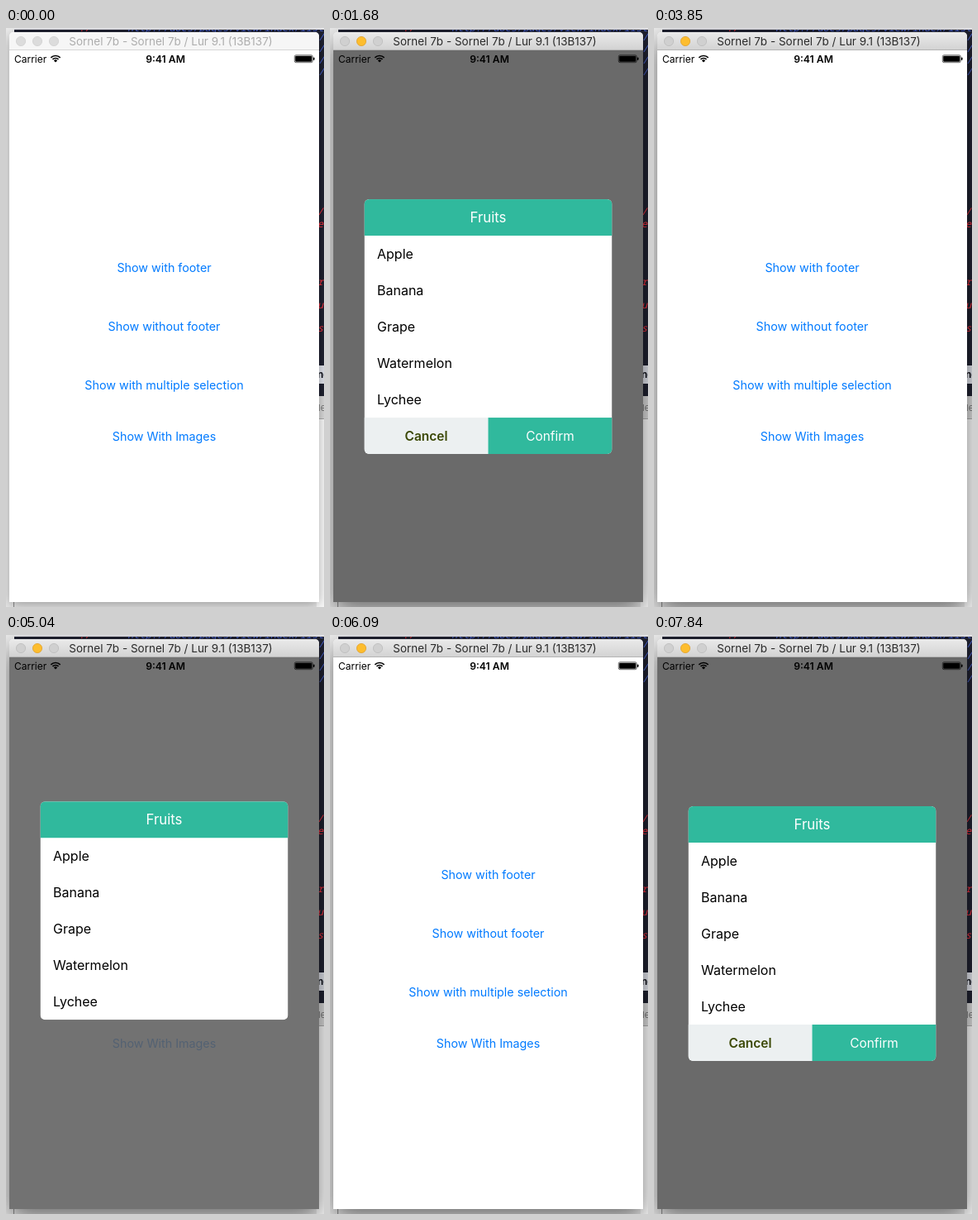
An HTML page with a canvas that plays this animation: 385x700 px, repeating every 8 s.

```html
<!DOCTYPE html>
<html lang="en">
<head>
<meta charset="utf-8">
<title>Picker dialog</title>
<style>
  html, body { margin: 0; width: 100%; height: 100%; overflow: hidden; background: #fff; }
  canvas { display: block; width: 385px; height: 700px; }
</style>
</head>
<body>
<canvas id="stage"></canvas>
<script>
const W = 385, H = 700, LOOP = 8000, STEP = 70;
const SCREEN = { x: 4, y: 27, w: 375, h: 667 };
const ROW = 44, TEAL = '#30b99d', BLUE = '#007aff';
const FRUITS = ['Apple', 'Banana', 'Grape', 'Watermelon', 'Lychee'];
const BUTTONS = [
  ['Show with footer', 290], ['Show without footer', 361],
  ['Show with multiple selection', 432], ['Show With Images', 494]
];
const DIALOGS = [
  { show: 1165, hide: 3537, button: 0, footer: true, pick: 2240, confirm: 3360 },
  { show: 4800, hide: 5735, button: 1, footer: false },
  { show: 7320, hide: Infinity, button: 2, footer: true }
];

const canvas = document.getElementById('stage');
const ratio = window.devicePixelRatio || 1;
canvas.width = Math.round(W * ratio);
canvas.height = Math.round(H * ratio);
const ctx = canvas.getContext('2d');
ctx.scale(ratio, ratio);

const clamp = v => Math.min(1, Math.max(0, v));
const smooth = v => { v = clamp(v); return v * v * (3 - 2 * v); };

// Remaining distance (1 to 0) of an underdamped spring with a starting push.
function spring(ms) {
  if (ms <= 0) return 1;
  const t = ms / 1000, omega = 20, damping = 0.7, push = 3;
  const wd = omega * Math.sqrt(1 - damping * damping);
  const k = (damping * omega - push) / wd;
  return Math.exp(-damping * omega * t) * (Math.cos(wd * t) + k * Math.sin(wd * t));
}

function rect(x, y, w, h, color) {
  ctx.fillStyle = color;
  ctx.fillRect(x, y, w, h);
}

function roundPath(x, y, w, h, r) {
  ctx.beginPath();
  ctx.roundRect(x, y, w, h, r);
}

function text(str, x, y, size, color, align = 'left', weight = 400, family = 'Inter, sans-serif') {
  ctx.font = `${weight} ${size}px ${family}`;
  ctx.textAlign = align;
  ctx.fillStyle = color;
  ctx.fillText(str, x, y);
}

function drawDesktop() {
  const mono = '"Noto Sans Mono", monospace';
  const code = (str, x, y, color, style = 'italic 400') => text(str, x, y, 12, color, 'left', style, mono);
  rect(0, 0, W, H, '#ececec');
  rect(10, 1, 375, 444, '#1f2130');
  code('./--', 88, 4, '#e8343c');
  code('http://docs/pages/view/index/list', 147, 4, '#4a62c8');
  rect(10, 0, 375, 2, '#e6e6ea');
  for (const y of [15, 29, 43, 57]) code('/v', 378, y, '#4a66d8');
  [['//', 226], ['er', 241], ['ra', 311], ['u', 339], ['se', 367]]
    .forEach(([str, y]) => code(str, 377, y, '#ff3340'));
  rect(376, 408, 9, 22, '#e4e7ef');
  code('no', 377, 423, '#15171f', 700);
  rect(376, 445, 9, 28, '#dedede');
  rect(376, 472, 9, 1, '#b0b0b0');
  text('le', 378, 463, 11, '#777');
  rect(376, 473, 9, 227, '#ffffff');
  rect(9, 694, 1, 6, '#8c8c8c');
}

function drawWindow(active) {
  ctx.save();
  ctx.shadowColor = active ? 'rgba(0,0,0,.55)' : 'rgba(0,0,0,.35)';
  ctx.shadowBlur = (active ? 30 : 16) * ratio;
  ctx.shadowOffsetY = (active ? 11 : 4) * ratio;
  roundPath(4, 5, 375, 689, [5, 5, 0, 0]);
  ctx.fillStyle = '#fff';
  ctx.fill();
  ctx.restore();

  const bar = ctx.createLinearGradient(0, 5, 0, 27);
  bar.addColorStop(0, active ? '#eaeaea' : '#f6f6f6');
  bar.addColorStop(1, active ? '#d2d2d2' : '#f6f6f6');
  roundPath(4, 5, 375, 22, [5, 5, 0, 0]);
  ctx.fillStyle = bar;
  ctx.fill();
  rect(4, 26, 375, 1, active ? '#b4b4b4' : '#d5d5d5');

  [18, 38, 58].forEach((x, i) => {
    const lit = active && i === 1;
    ctx.beginPath();
    ctx.arc(x, 16, 5.6, 0, Math.PI * 2);
    ctx.fillStyle = lit ? '#fdbd2e' : active ? '#d0d0d0' : '#dcdcdc';
    ctx.strokeStyle = lit ? '#e0a02a' : active ? '#bcbcbc' : '#d0d0d0';
    ctx.lineWidth = 0.8;
    ctx.fill();
    ctx.stroke();
  });
  text('Sornel 7b - Sornel 7b / Lur 9.1 (13B137)', 199.5, 21, 13.5, active ? '#2a2a2a' : '#adadad', 'center');
}

function drawStatusBar() {
  text('Carrier', 10, 41.5, 12, '#000');
  ctx.strokeStyle = '#000';
  ctx.lineWidth = 1.7;
  for (const r of [8, 5]) {
    ctx.beginPath();
    ctx.arc(60, 41.5, r, -Math.PI * 0.75, -Math.PI * 0.25);
    ctx.stroke();
  }
  ctx.beginPath();
  ctx.moveTo(60, 41.5);
  ctx.arc(60, 41.5, 3, -Math.PI * 0.75, -Math.PI * 0.25);
  ctx.fillStyle = '#000';
  ctx.fill();
  text('9:41 AM', 193, 41.5, 12.2, '#000', 'center', 600);

  ctx.lineWidth = 0.6;
  roundPath(349.3, 32.8, 22, 8.9, 1.8);
  ctx.stroke();
  roundPath(350.2, 33.7, 20.2, 7.1, 1);
  ctx.fill();
  roundPath(372, 35.5, 1.5, 3.5, 1);
  ctx.fill();
}

function drawButtons(dim, pressed) {
  BUTTONS.forEach(([label, y], i) => {
    ctx.globalAlpha = i === pressed ? 0.2 : 1 - 0.77 * dim;
    text(label, 191.5, y + 5, 14.3, BLUE, 'center');
  });
  ctx.globalAlpha = 1;
}

function drawCheck(x, y) {
  ctx.beginPath();
  ctx.moveTo(x, y);
  ctx.lineTo(x + 4, y + 4);
  ctx.lineTo(x + 12, y - 5);
  ctx.strokeStyle = BLUE;
  ctx.lineWidth = 2;
  ctx.stroke();
}

function drawCard(dialog, offset, t) {
  const x = 41.5, w = 300, listH = ROW * FRUITS.length;
  const h = ROW + listH + (dialog.footer ? ROW : 0);
  const top = SCREEN.y + (SCREEN.h - h) / 2 + offset;
  if (top > SCREEN.y + SCREEN.h) return;

  ctx.save();
  roundPath(x, top, w, h, 6);
  ctx.clip();
  rect(x, top, w, h, '#fff');
  rect(x, top, w, ROW, TEAL);
  text('Fruits', 191.5, top + 28, 16.8, '#fff', 'center');

  const sincePick = t - dialog.pick;
  if (sincePick >= 0) {
    const shade = 1 - clamp((sincePick - STEP) / 350);
    rect(x, top + ROW, w, ROW, `rgba(217,217,217,${shade})`);
    if (sincePick >= STEP) drawCheck(313, top + 67.5);
  }
  FRUITS.forEach((name, i) => text(name, 57, top + ROW * (i + 1) + 28, 16, '#000'));

  if (dialog.footer) {
    const y = top + ROW + listH;
    const held = t >= dialog.confirm && t < dialog.hide;
    rect(x, y, w / 2, ROW, '#ecf0f1');
    rect(x + w / 2, y, w / 2, ROW, TEAL);
    text('Cancel', x + w / 4, y + 27.5, 15.5, '#3b4805', 'center', 600);
    text('Confirm', x + w * 0.75, y + 27.5, 15.4, held ? '#d5ebe7' : '#fff', 'center');
  }
  ctx.restore();
}

function draw(time) {
  const t = Math.floor(time / STEP) * STEP;
  const dialog = DIALOGS.find(d => t >= d.show - 40 && t < d.hide + 300);
  let dim = 0, offset = SCREEN.h, pressed = -1;
  if (dialog) {
    const leaving = t >= dialog.hide;
    dim = leaving ? 1 - smooth((t - dialog.hide - 30) / 270) : smooth((t - dialog.show) / 280);
    offset = SCREEN.h * (leaving ? 1 - spring(t - dialog.hide) : spring(t - dialog.show));
    if (t < dialog.show + 40) pressed = dialog.button;
  }

  drawDesktop();
  drawWindow(t >= 980);
  ctx.save();
  ctx.beginPath();
  ctx.rect(SCREEN.x, SCREEN.y, SCREEN.w, SCREEN.h);
  ctx.clip();
  drawButtons(dim, pressed);
  rect(SCREEN.x, SCREEN.y, SCREEN.w, SCREEN.h, `rgba(0,0,0,${0.585 * dim})`);
  drawStatusBar();
  if (dialog) drawCard(dialog, offset, t);
  ctx.restore();
}

const start = performance.now();
function tick() {
  draw((performance.now() - start) % LOOP);
  requestAnimationFrame(tick);
}
tick();
</script>
</body>
</html>
```
